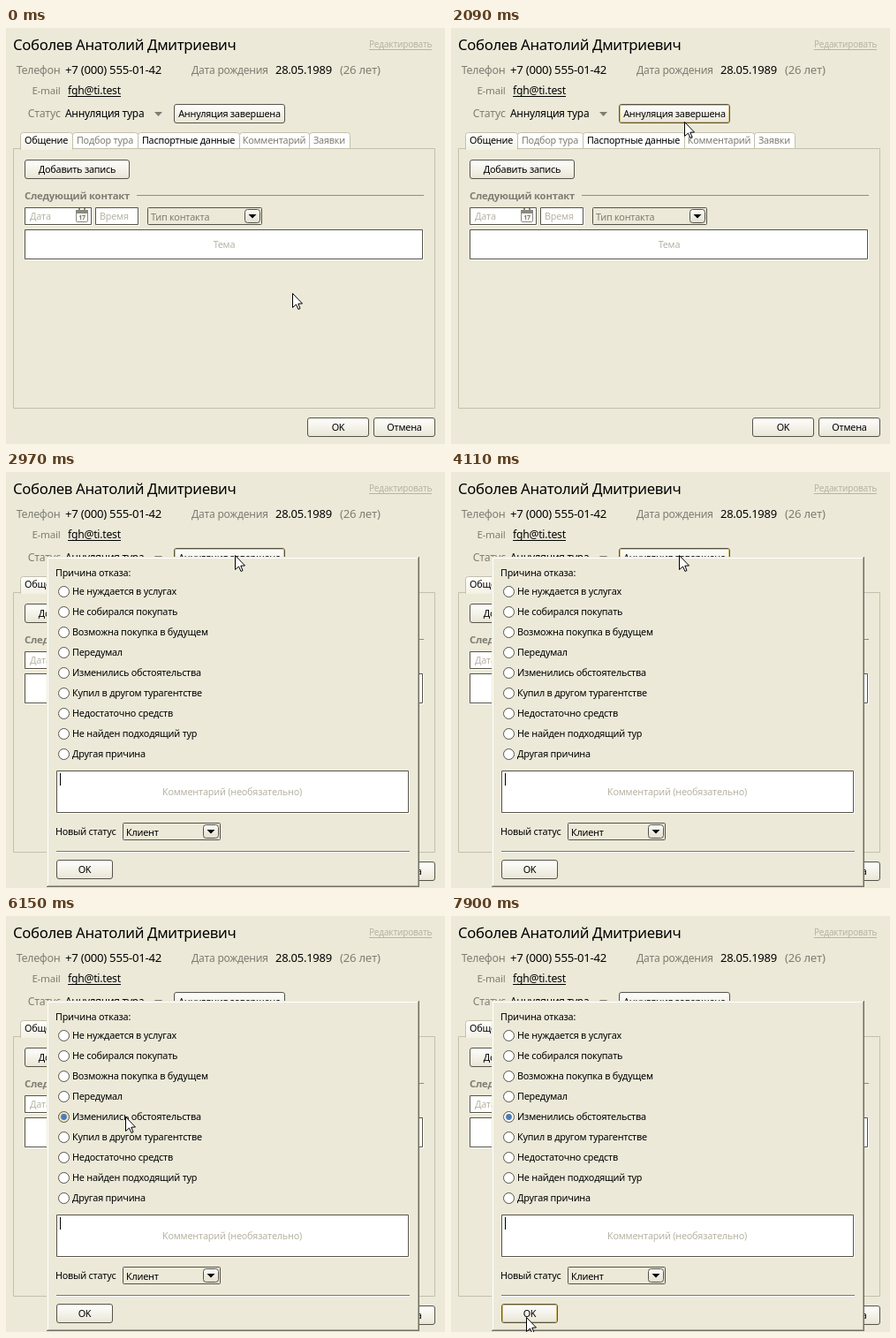
An HTML page with a canvas for the animation above (8 s loop, 497 by 471 pixels).

```html
<!DOCTYPE html>
<html lang="ru">
<head>
<meta charset="utf-8">
<style>
html, body { margin: 0; width: 100%; height: 100%; overflow: hidden; background: #ece9d8; }
canvas { display: block; }
</style>
</head>
<body>
<canvas id="stage" width="497" height="471"></canvas>
<script>
const c = document.getElementById('stage').getContext('2d');
const BG = '#ece9d8', INK = '#000', DARK = '#55534a', GRAY = '#7f7d72', PALE = '#b7b4a4', EDGE = '#c3c0ac';
const LOOP = 8000, POPUP_AT = 2960;
const REASONS = ['Не нуждается в услугах', 'Не собирался покупать', 'Возможна покупка в будущем',
  'Передумал', 'Изменились обстоятельства', 'Купил в другом турагентстве',
  'Недостаточно средств', 'Не найден подходящий тур', 'Другая причина'];
const CHOSEN = 4;

// Pointer moves: start and end time, then start, control and end point
const MOVES = [
  [720, 2660, 324, 300, 302.5, 195, 259, 94],
  [3830, 5560, 259, 94, 184, 125, 135, 227],
  [6780, 7820, 135, 227, 112, 340, 85, 454]
];
const CLICKS = [[2680, POPUP_AT], [5840, 6140]];

const ease = u => u < .5 ? 8 * u ** 4 : 1 - 8 * (1 - u) ** 4;
const during = (t, [a, b]) => t >= a && t < b;

function pointer(t) {
  const [a, b, x0, y0, x1, y1, x2, y2] = MOVES.findLast(m => t >= m[0]) || MOVES[0];
  const s = ease(Math.min(1, Math.max(0, (t - a) / (b - a)))), r = 1 - s;
  const mix = (p, q, w) => Math.round(r * r * p + 2 * r * s * q + s * s * w);
  return { x: mix(x0, x1, x2), y: mix(y0, y1, y2) };
}

function text(s, x, y, color = INK, size = 10.8, align = 'left', weight = '') {
  c.font = `${weight} ${size}px "Noto Sans", "Open Sans", sans-serif`;
  c.letterSpacing = `${-.02 * size}px`;
  c.textAlign = align;
  c.fillStyle = color;
  c.fillText(s, x, y);
  return c.measureText(s).width;
}

function link(s, x, y, color, size) {
  c.fillRect(x, y + 2, Math.round(text(s, x, y, color, size)), 1);
}

function fill(x, y, w, h, color) {
  c.fillStyle = color;
  c.fillRect(x, y, w, h);
}

function box(x, y, w, h, color, edge = DARK, radius = 0) {
  c.beginPath();
  c.roundRect(x + .5, y + .5, w - 1, h - 1, radius);
  c.fillStyle = color;
  c.fill();
  c.strokeStyle = edge;
  c.lineWidth = 1;
  c.stroke();
}

function shade(y, h, from, to) {
  const g = c.createLinearGradient(0, y, 0, y + h);
  g.addColorStop(0, from);
  g.addColorStop(1, to);
  return g;
}

function poly(points, color, edge) {
  c.beginPath();
  points.forEach(([x, y]) => c.lineTo(x, y));
  c.closePath();
  c.fillStyle = color;
  c.fill();
  if (!edge) return;
  c.strokeStyle = edge;
  c.lineWidth = 1;
  c.stroke();
}

function button(label, x, y, w, h, hover, pressed) {
  const face = shade(y, h, '#fff', '#e9e5d3');
  box(x, y, w, h, pressed ? '#ffd24a' : face, DARK, 2.5);
  if (hover && !pressed) box(x + 1, y + 1, w - 2, h - 2, face, '#d3bd72', 1.5);
  text(label, x + w / 2, y + 15, INK, 10.8, 'center');
}

function combo(label, x, y, w, color) {
  box(x, y, w, 20, BG, DARK, 1);
  text(label, x + 4, y + 15, color);
  const bx = x + w - 20;
  box(bx, y + 2, 18, 16, shade(y, 18, '#fff', '#e2dfce'), DARK, 3);
  poly([[bx + 4.5, y + 8], [bx + 13.5, y + 8], [bx + 9, y + 12.5]], INK);
}

function field(x, y, w, h) {
  fill(x + 1, y + 1, w, h, '#fff');
  box(x, y, w, h, '#fff');
}

function tab(label, x, w, color, active) {
  box(x, 118, w + 1, active ? 20 : 19, active ? shade(118, 20, '#fff', '#f4f1e4') : '#fff', EDGE, [3, 3, 0, 0]);
  text(label, x + w / 2, 131, color, 10.8, 'center');
}

function calendar(x, y) {
  box(x, y + 2, 14, 14, '#fff', '#8b897d', 1);
  fill(x, y + 2, 14, 4, '#8b897d');
  fill(x + 3, y, 2, 4, '#8b897d');
  fill(x + 9, y, 2, 4, '#8b897d');
  text('17', x + 7, y + 13, '#77756a', 7, 'center', 'bold');
}

function card(hover, pressed) {
  text('Соболев Анатолий Дмитриевич', 8, 25, INK, 16.7);
  link('Редактировать', 411, 22, PALE, 10);
  text('Телефон', 61.5, 52, GRAY, 12.4, 'right');
  text('+7 (000) 555-01-42', 67, 52, INK, 13.2);
  text('Дата рождения', 210, 52, GRAY, 12);
  text('28.05.1989', 305, 52, INK, 13);
  text('(26 лет)', 378, 52, GRAY, 13.2);
  text('E-mail', 61.5, 75, GRAY, 11.6, 'right');
  link('fgh@ti.test', 70, 75, INK, 12.2);
  text('Статус', 61.5, 101, GRAY, 12.2, 'right');
  text('Аннуляция тура', 67, 101, INK, 11.9);
  poly([[168, 95], [177, 95], [172.5, 100]], GRAY);
  button('Аннуляция завершена', 190, 86, 126, 22, hover, pressed);

  box(8, 136, 478, 295, BG, EDGE);
  tab('Подбор тура', 75, 74, GRAY);
  tab('Паспортные данные', 149, 115, INK);
  tab('Комментарий', 264, 79, GRAY);
  tab('Заявки', 343, 46, GRAY);
  tab('Общение', 16, 59, INK, true);
  fill(17, 136, 58, 2, '#f4f1e4');

  button('Добавить запись', 21, 149, 119, 22);
  text('Следующий контакт', 21, 194, GRAY, 11.3, 'left', 'bold');
  fill(148, 189, 325, 1, '#8f8d80');
  field(21, 203, 76, 20);
  text('Дата', 27, 217, PALE);
  calendar(79, 204);
  field(101, 203, 49, 20);
  text('Время', 106, 217, PALE);
  combo('Тип контакта', 160, 203, 130, GRAY);
  field(21, 228, 451, 34);
  text('Тема', 247, 249, PALE, 10.8, 'center');
  button('OK', 341, 441, 70, 22);
  button('Отмена', 416, 441, 70, 22);
}

function radio(label, y, p, chosen) {
  const width = text(label, 75, y + 4);
  const hover = Math.abs(p.y - y) < 11.5 && p.x > 58 && p.x < 75 + width;
  c.beginPath();
  c.arc(65.5, y + .5, 6, 0, 7);
  c.fillStyle = hover ? '#ece7c9' : '#fff';
  c.fill();
  c.strokeStyle = DARK;
  c.lineWidth = 1;
  c.stroke();
  if (!chosen) return;
  c.beginPath();
  c.arc(65.5, y + .5, 3.4, 0, 7);
  c.fillStyle = '#4d7cb4';
  c.fill();
}

function popup(t, p) {
  // Raised window edge: light above and left, dark below and right
  fill(46, 96, 422, 374, '#716f64');
  fill(46, 96, 421, 373, BG);
  fill(47, 97, 420, 372, '#aca899');
  fill(47, 97, 419, 371, '#fff');
  fill(48, 98, 418, 370, BG);
  text('Причина отказа:', 56, 118);
  REASONS.forEach((s, i) => radio(s, 135 + 23 * i, p, i === CHOSEN && t >= 5970));
  field(57, 338, 399, 48);
  text('Комментарий (необязательно)', 256, 366, PALE, 10.8, 'center');
  if ((t - 2920) % 990 < 495) fill(61, 341, 1, 14, INK);
  text('Новый статус', 56, 411);
  combo('Клиент', 132, 397, 111, INK);
  fill(57, 429, 400, 1, '#77756a');
  fill(57, 430, 400, 1, '#fff');
  button('OK', 57, 439, 64, 22, p.x > 57 && p.x < 121 && p.y >= 439);
}

function arrow({ x, y }) {
  const shape = [[0, 0], [0, 16], [4, 12.5], [6.5, 18], [8.5, 17], [6.3, 11.7], [11, 11.5]];
  poly(shape.map(([dx, dy]) => [x + dx + .5, y + dy + .5]), '#fff', INK);
}

function draw(now) {
  const t = now % LOOP, p = pointer(t), open = t >= POPUP_AT;
  const over = p.x > 190 && p.x < 316 && p.y > 86 && p.y < (open ? 96 : 108);
  const click = CLICKS.some(span => during(t, span));
  fill(0, 0, 497, 471, BG);
  card(over, over && click);
  if (open) popup(t, p);
  if (click) {
    c.beginPath();
    c.arc(p.x + .5, p.y + .5, 9, 0, 7);
    c.strokeStyle = INK;
    c.lineWidth = 1.6;
    c.stroke();
  }
  arrow(p);
  requestAnimationFrame(draw);
}
requestAnimationFrame(draw);
</script>
</body>
</html>
```
